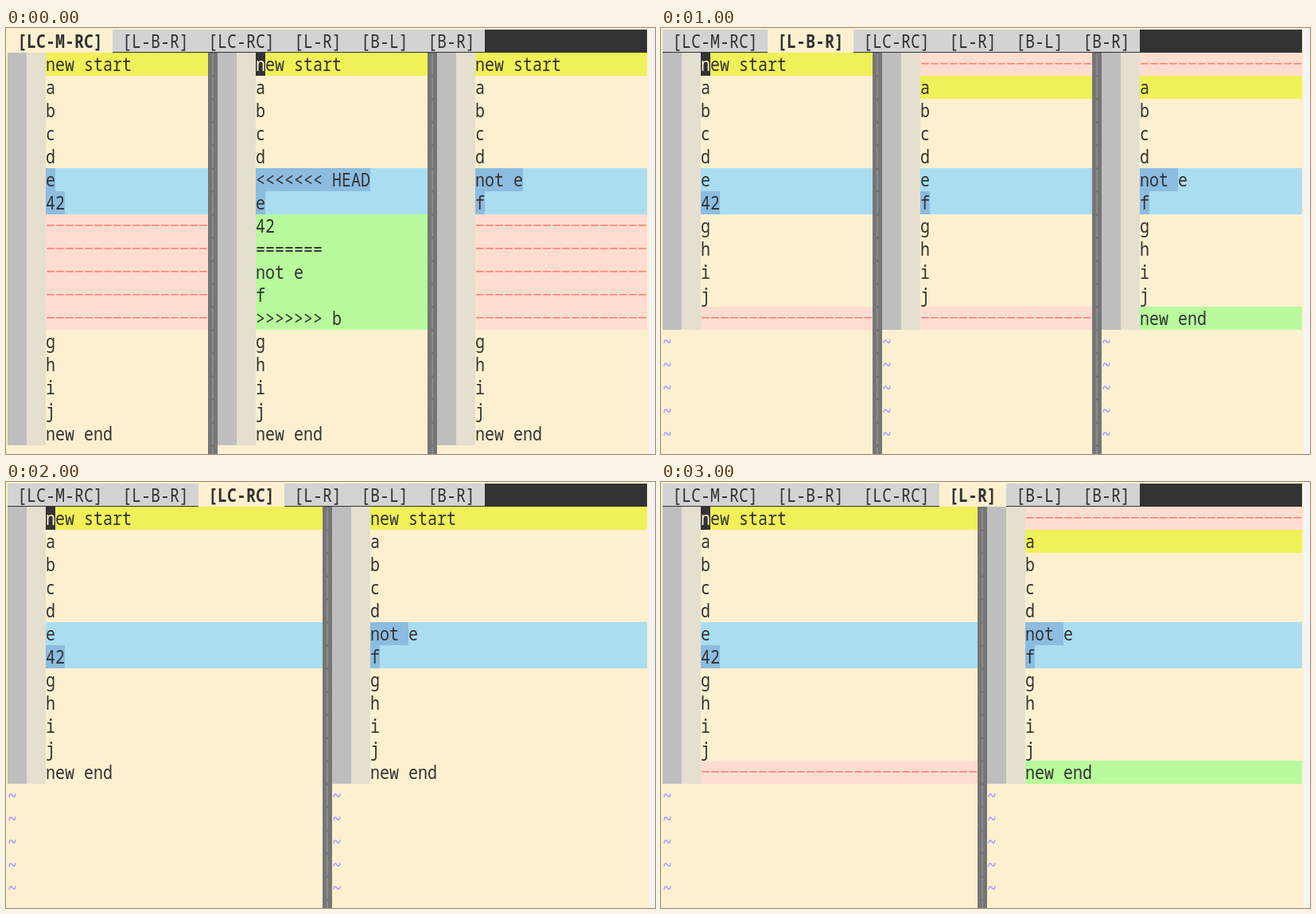
An HTML page with a canvas that plays this animation: 816x535 px, repeating every 4000 ms.

```html
<!DOCTYPE html>
<html lang="en">
<head>
<meta charset="utf-8">
<title>Merge views</title>
<style>
  html, body { margin: 0; width: 100%; height: 100%; overflow: hidden; background: #fcf0d0; }
  canvas { display: block; }
</style>
</head>
<body>
<canvas id="stage" width="816" height="535"></canvas>
<script>
const ctx = document.getElementById('stage').getContext('2d');

// Character grid
const CW = 12, CH = 29, X0 = 2, Y0 = 2, COLS = 67, BASE = 23;
const TALL = 1.19; // tall terminal face
const STEP = 1000;

const C = {
  paper: '#fcf0d0', edge: '#f7f5f3', ink: '#333333', tab: '#d3d3d3',
  sign: '#bebebe', number: '#e5dfd0', split: '#767676', bar: '#8b8b8b',
  word: '#8cbce0', dash: '#ff8079', tilde: '#a5a0ff'
};
const LINE = { y: '#f0f058', b: '#abddf1', g: '#b8fa9c', x: '#ffddd0' };
const TABS = ['[LC-M-RC]', '[L-B-R]', '[LC-RC]', '[L-R]', '[B-L]', '[B-R]'];

// A line is [text, kind, highlighted characters]
const plain = s => s.split(' ').map(t => [t]);
const filler = n => Array.from({ length: n }, () => ['', 'x']);
const start = ['new start', 'y'], end = ['new end'], added = ['new end', 'g'];
const gap = ['', 'x'], first = ['a', 'y'];
const abcd = plain('a b c d'), bcd = plain('b c d'), ghij = plain('g h i j');
const ours = [['e', 'b'], ['42', 'b', 2]];
const base = [['e', 'b'], ['f', 'b', 1]];
const theirs = [['not e', 'b', 4], ['f', 'b', 1]];
const conflict = [
  ['<<<<<<< HEAD', 'b', 12], ['e', 'b', 1],
  ...['42', '=======', 'not e', 'f', '>>>>>>> b'].map(t => [t, 'g'])
];

const pane = (col, width, lines, cursor) => ({ col, width, lines, cursor });
const VIEWS = [
  [
    pane(0, 21, [start, ...abcd, ['e', 'b', 1], ['42', 'b', 2], ...filler(5), ...ghij, end]),
    pane(22, 22, [start, ...abcd, ...conflict, ...ghij, end], true),
    pane(45, 22, [start, ...abcd, ['not e', 'b', 5], ['f', 'b', 1], ...filler(5), ...ghij, end])
  ],
  [
    pane(0, 22, [start, ...abcd, ...ours, ...ghij, gap], true),
    pane(23, 22, [gap, first, ...bcd, ...base, ...ghij, gap]),
    pane(46, 21, [gap, first, ...bcd, ...theirs, ...ghij, added])
  ],
  [
    pane(0, 33, [start, ...abcd, ...ours, ...ghij, end], true),
    pane(34, 33, [start, ...abcd, ...theirs, ...ghij, end])
  ],
  [
    pane(0, 33, [start, ...abcd, ...ours, ...ghij, gap], true),
    pane(34, 33, [gap, first, ...bcd, ...theirs, ...ghij, added])
  ]
];

const px = col => X0 + col * CW;
const py = row => Y0 + row * CH;

function rect(x, y, w, h, color) {
  ctx.fillStyle = color;
  ctx.fillRect(x, y, w, h);
}

function cells(col, row, w, h, color) {
  rect(px(col), py(row), w * CW, h * CH, color);
}

function text(str, col, row, color = C.ink, bold = false) {
  ctx.save();
  ctx.translate(px(col), py(row) + BASE);
  ctx.scale(1, TALL);
  ctx.font = `${bold ? 'bold ' : ''}20px "Noto Sans Mono", monospace`;
  ctx.fillStyle = color;
  ctx.fillText(str, 0, 0);
  ctx.restore();
}

function drawTabs(active) {
  let col = 0;
  TABS.forEach((name, i) => {
    const w = name.length + 2;
    if (i !== active) {
      cells(col, 0, w, 1, C.tab);
      rect(px(col), py(1) - 1, w * CW, 1, C.ink);
    }
    text(name, col + 1, 0, C.ink, i === active);
    col += w;
  });
  cells(col, 0, COLS - col, 1, C.ink);
}

function drawLine([str, kind, marked = 0], col, row, width) {
  if (kind) cells(col, row, width, 1, LINE[kind]);
  if (marked) cells(col, row, marked, 1, C.word);
  if (kind === 'x') {
    for (let i = 0; i < width; i++) rect(px(col + i) + 1.2, py(row) + 13, 9.6, 1.6, C.dash);
  }
  text(str, col, row);
}

function drawSplit(col) {
  rect(px(col), py(1), CW, 535, C.split);
  for (let row = 1; row < 19; row++) rect(px(col) + 5, py(row) + 2, 2, CH - 3, C.bar);
}

function drawPane({ col, width, lines, cursor }) {
  const body = col + 4;
  cells(col, 1, 2, lines.length, C.sign);
  cells(col + 2, 1, 2, lines.length, C.number);
  lines.forEach((line, i) => drawLine(line, body, i + 1, width - 4));
  for (let row = lines.length + 1; row < 18; row++) text('~', col, row, C.tilde, true);
  if (cursor) {
    cells(body, 1, 1, 1, C.ink);
    text('n', body, 1, C.paper);
  }
  if (col + width < COLS) drawSplit(col + width);
}

function draw(view) {
  rect(0, 0, 816, 535, C.paper);
  rect(808, 0, 8, 535, C.edge);
  drawTabs(view);
  VIEWS[view].forEach(drawPane);
}

function tick() {
  draw(Math.floor(performance.now() / STEP) % VIEWS.length);
  requestAnimationFrame(tick);
}
tick();
</script>
</body>
</html>
```
